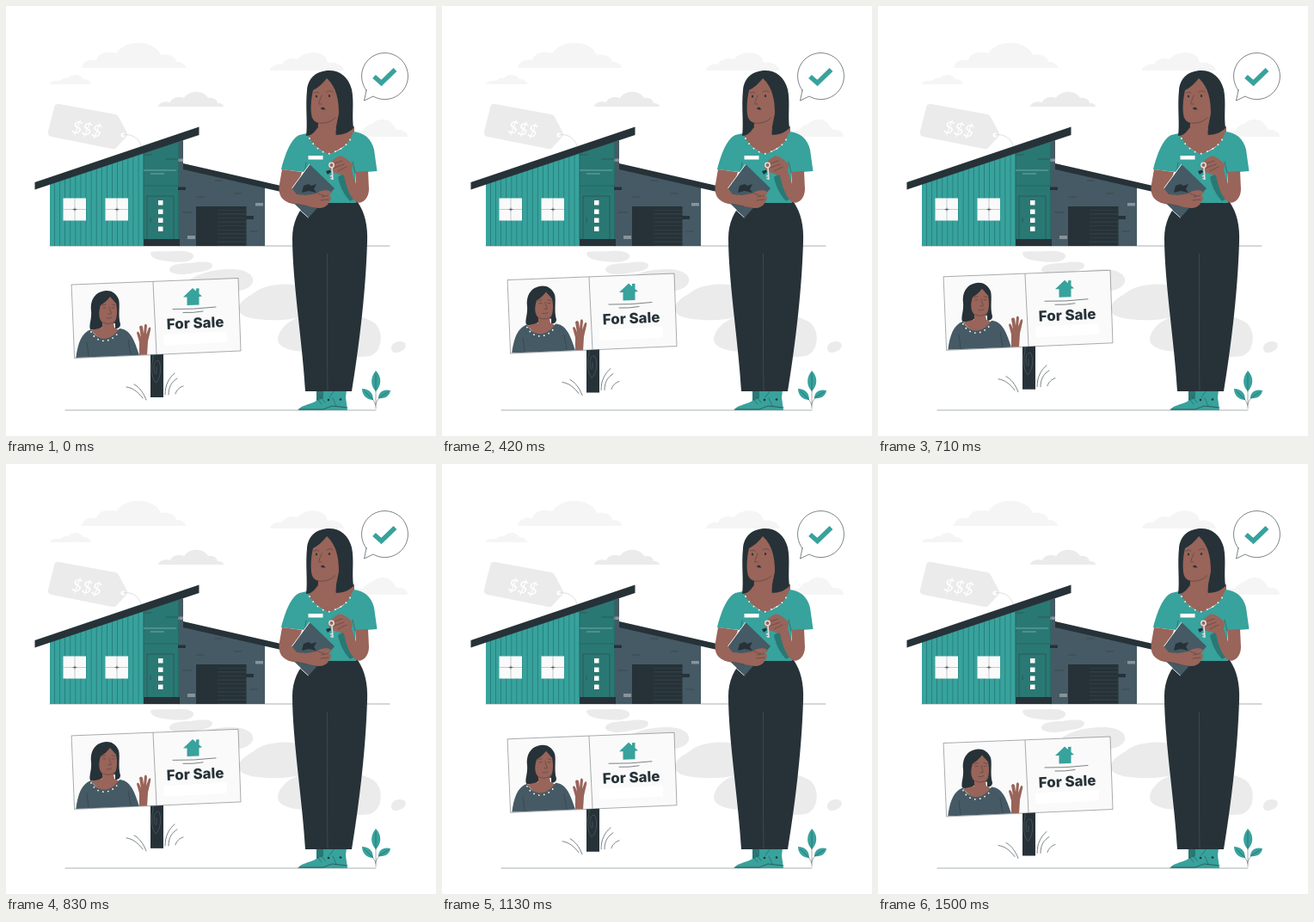
Animation, 500 px wide and 500 px high, one loop 1.54 s. Source, as an HTML page:

```html
<!DOCTYPE html>
<html lang="en">
<head>
<meta charset="utf-8">
<title>For Sale</title>
<style>
  html, body { margin: 0; height: 100%; overflow: hidden; background: #fff; }
  svg { display: block; width: 100%; height: 100%; }
  .dark { fill: #263238; }
  .slate { fill: #455a64; }
  .teal { fill: #38a29c; }
  .deep { fill: #2a7874; }
  .skin { fill: #996459; }
  .grey { fill: #ebebeb; }
  .pale { fill: #f5f5f5; }
  .white { fill: #fff; }
  .line { fill: none; stroke: #263238; stroke-width: .6; stroke-linecap: round; stroke-linejoin: round; }
  .fine { stroke-width: .4; }
  .soft { stroke: #6d7c83; }
  .beads { fill: none; stroke: #fff; stroke-linecap: round; stroke-width: 1.8; }
</style>
</head>
<body>
<svg viewBox="0 0 500 500">
  <defs>
    <clipPath id="wall"><path d="M51 207 160 171V279H51Z"/></clipPath>
    <clipPath id="portrait"><path d="M77 324 171 321 175 405 80 409Z"/></clipPath>
  </defs>

  <!-- sky -->
  <g class="pale">
    <path d="M88 72C89 65 97 61 105 63 107 54 119 52 128 55 136 43 154 40 167 45 174 48 178 52 180 57 190 55 198 60 198 65 205 65 209 68 209 72Z"/>
    <path d="M307 75C308 69 315 67 321 68 324 61 333 60 339 62 346 54 360 52 368 57 373 60 373 63 374 66 384 64 391 69 393 75Z"/>
    <path d="M51 91C52 87 58 86 63 87 66 84 69 83 72 84 77 78 86 79 90 85 95 85 99 88 99 91Z"/>
    <path d="M400 152C402 145 410 145 415 145 419 139 422 138 426 137 432 130 445 131 449 137 452 140 453 142 454 144 462 143 467 147 467 152Z"/>
  </g>
  <path class="grey" d="M177 117C178 112 185 110 191 112 193 106 201 105 207 107 213 98 229 97 235 107 242 106 246 110 246 113 251 113 253 115 253 117Z"/>

  <!-- price tag -->
  <path class="grey" d="M62 114 127 126Q129 126 131 129L140 146Q142 149 140 152L129 164Q127 167 123 166L53 152Q48 151 49 146L56 118Q57 113 62 114Z"/>
  <circle class="white" cx="136" cy="150" r="2.6"/>
  <path d="M136 150C146 148 155 154 157 163" fill="none" stroke="#dedede"/>
  <text class="white" transform="translate(75 147) rotate(10) skewX(-8)" font-family="Lato, sans-serif" font-size="20">$$$</text>

  <!-- stepping stones -->
  <g class="grey">
    <path d="M168 287C170 284 187 286 197 285 211 284 220 288 218 292 216 297 205 299 190 297 177 296 168 293 168 287Z"/>
    <path d="M190 307C190 300 205 299 215 299 223 297 241 296 240 302 239 309 222 309 215 311 204 313 191 312 190 307Z"/>
    <path d="M214 318C225 311 239 306 262 306 278 306 289 312 287 321 284 331 263 335 245 330 230 327 216 326 214 318Z"/>
    <path d="M271 350C273 341 283 338 292 331 306 322 333 322 344 326V361C329 366 309 366 292 364 277 362 270 359 271 350Z"/>
    <path d="M316 388C317 375 330 363 350 360 382 354 413 358 428 368 440 378 438 403 423 407 403 410 386 405 366 401 346 404 317 401 316 388Z"/>
    <path d="M448 397C449 390 460 388 464 392 467 397 461 402 454 403 449 403 448 401 448 397Z"/>
  </g>

  <!-- house -->
  <path class="line soft" d="M51 279H446"/>
  <path class="slate" d="M200 158 206 156V189L301 211V279H200Z"/>
  <path class="dark" d="M206 183 324 210V217L206 190Z"/>
  <path class="teal" d="M51 207 160 171V279H51Z"/>
  <path clip-path="url(#wall)" d="M56 225H160" fill="none" stroke="#237a78" stroke-width="110" stroke-dasharray=".8 5.3"/>
  <path class="deep" d="M160 171 202 157V279H160Z"/>
  <path d="M160 209H201M160 172V271" stroke="#1f5f5e" stroke-width=".7"/>
  <path d="M160 191H198M168 195H184" stroke="#8fc0bd" stroke-width=".7"/>
  <path class="line fine" d="M160 173H169M186 178H200M164 271V221H195V271M168 246V251"/>
  <path class="dark" d="M160 271H202V279H160ZM33.500 205 224.500 140.500V150L33.500 213.500Z"/>
  <path class="white" d="M177 226h5.500v5.500h-5.500zM177 236.500h5.500v5.500h-5.500zM177 246.500h5.500v5.500h-5.500zM177 256.500h5.500v5.500h-5.500z"/>
  <g id="window">
    <path d="M66.500 223.500H93V249.500H66.500Z" fill="#fafafa"/>
    <path class="line fine soft" d="M80 224V249M67 236.500H93"/>
    <path class="line" d="M78 236.500H82M80 235V238"/>
  </g>
  <use href="#window" x="49"/>
  <path class="dark" d="M221 233H279.500V279H221ZM200 210.500H209V214H200ZM279 244H288V248H279Z"/>
  <path d="M262.500 237V279" fill="none" stroke="#3a484f" stroke-width="33" stroke-dasharray=".6 4"/>
  <path d="M200 177.500H206V181H200ZM211 267H220V271H211ZM290 229H299V232.500H290Z" fill="#87949a"/>
  <path class="line fine" d="M205 240H215M243 203H251M284 262H292M222 222H230M266 218H274M201 159V279"/>

  <!-- speech bubble -->
  <path class="line" style="fill:#fff" d="M419 98 416.500 110 427 105A27 27 0 1 0 419 98Z"/>
  <path d="M428 82 436.500 89.500 452.500 74" fill="none" stroke="#38a29c" stroke-width="5.500"/>

  <!-- foreground -->
  <path class="line soft" d="M69 470H430"/>
  <path class="line fine" d="M430 468V436M430 465C429 459 424 455 418 449M430 463C431 457 437 453 444 449"/>
  <g class="teal">
    <path d="M430 448C423 441 424 431 430 424 437 431 437 441 430 448Z"/>
    <path d="M427 458C419 458 414 452 414 445 422 445 427 450 427 458Z"/>
    <path d="M433 456C433 449 439 445 447 447 446 454 440 457 433 456Z"/>
  </g>
  <path class="line fine" d="M430 428V448M417 448 427 458M444 449 433 456"/>

  <!-- agent -->
  <path class="deep" d="M361 445H380V465H361Z"/>
  <path class="teal" d="M369 447H396L395 455 397 470H340C342 464 353 464 361 459L369 456Z"/>
  <path class="line" d="M340 469H369L379 465 397 467"/>
  <path class="line fine" d="M362 457 367 463M366 455 371 461M382 447 376 455M380 456 384 465"/>
  <circle class="dark" cx="375" cy="458" r="1.300"/><circle class="dark" cx="389" cy="457.500" r="1.300"/>
  <path class="dark" d="M350 228H409C417 240 421 255 420 275 418 340 409 405 402 448H348C345 393 333 320 333 270 333 252 340 238 350 228Z"/>
  <path d="M373.500 288C374 340 373 400 374 447" fill="none" stroke="#455a64" stroke-width=".6"/>

  <path class="skin" d="M350 140H405V156L375 174 350 156Z"/>
  <path class="teal" d="M350 148C355 160 364 168 375 172 388 169 399 162 404 146 416 147 425 154 428 167L431.500 192 406 194 407 229H347L346 193 320 190C325 170 332 154 341 150Z"/>
  <path class="deep" d="M386 199 395 193C397 207 401 216 407 223L400 227C392 218 388 209 386 199Z"/>
  <path class="line fine" d="M347 194 349 182M406 194 403 181"/>
  <path class="beads" d="M353 154C358 163 366 170 375 172 387 168 396 164 402 152" stroke-dasharray="0 7.500"/>
  <path class="white" d="M351.500 174H368.500V178.500H351.500Z"/>

  <path class="dark" d="M376 75C361 75 351 84 350 98 348 117 351 137 349 151 354 151 358 148 362 142L384 142 383 150C392 150 399 147 404 142 402 126 405 112 402 97 398 82 388 75 376 75Z"/>
  <path class="skin" d="M373 84C368 91 361 96 357 98 354 111 354 123 356 130 358 134 361 135 363 136L362 154 375 168 384 152 383 145 387 125C387 111 385 95 373 84Z"/>
  <path class="line fine" d="M358 101Q361 99 364 101M373 100Q377 97 380 100M367 104C366 109 363 112 364 114H367M363 136Q374 138 383 130"/>
  <ellipse class="dark" cx="361" cy="105" rx="1.100" ry="1.500"/><ellipse class="dark" cx="376" cy="104.500" rx="1.100" ry="1.500"/>
  <path class="dark" d="M365.500 119 369 117.500 371.500 120.500 368 120.500Z"/>

  <path class="skin" d="M321 190 344 193 340 207 349 215 368 213 378 222 375 229C371 235 364 236 357 234L333 230C320 227 316 219 318 207Z"/>
  <path class="slate" d="M353 184 382 212 352 246 326 221Z"/>
  <path d="M353 184 331 214M335 231 351.500 246" fill="none" stroke="#fff" stroke-width=".9"/>
  <path class="dark" d="M346 209 352 207 355 209 361 207 358 213 361 217 352 215 344 217Z"/>
  <path class="skin" d="M318 207C318 220 326 228 336 230L357 234C366 236 373 234 375 229L378 225 377 222 371 221 379 218C378 213 367 213 361 218L349 220 338 219 330 209Z"/>
  <path class="line fine" d="M363 218 371 221 367 222M366 226 375 225M338 230 351 233"/>

  <path class="skin" d="M406 193 421 192 422 213C422 224 414 231 407 228 399 222 395 207 393 197L382 194 375 188C374 183 380 179 386 175 391 173 398 179 403 184L402 192 407 207Z"/>
  <path class="line fine" d="M382 183 391 180M382 188 393 184M386 192 396 187"/>
  <circle cx="378.500" cy="185" r="2.700" fill="none" stroke="#e0e0e0" stroke-width="1.500"/>
  <path d="M379 188 380 202M380 197 377 198M380 200 377.500 201" fill="none" stroke="#e0e0e0" stroke-width="1.600"/>
  <path class="dark" d="M372 192 377 190.500 378 193 374 196Z"/>

  <!-- sign -->
  <g id="sign">
    <path class="dark" d="M168 403H183V455H168Z"/>
    <path class="line fine soft" d="M171 404V411C168 419 169 432 174 438 180 433 181 420 178 413 175 411 172 414 172 421 172 426 174 430 175 426V420"/>
    <path class="line" d="M163 458C160 450 155 443 149 440M159 456C153 448 147 444 140 443M185 452C185 441 189 433 196 427M189 452C189 442 193 437 199 433M197 451C198 447 202 443 206 442"/>
    <path class="line fine" style="fill:#fafafa" d="M76.500 324 270 316.500 273 401 80 409.500Z"/>
    <path class="line fine" d="M171 321 175 404.500"/>
    <g clip-path="url(#portrait)">
      <path class="dark" d="M117 331C103 332 98 342 99 354 100 364 96 371 98 376 104 378 110 376 114 371L127 369 127 375C131 375 133 373 133 370 130 360 133 348 131 341 128 334 123 331 117 331Z"/>
      <path class="skin" d="M121 338C117 343 113 346 110 348 107 357 108 364 112 368V374L99 377 111 390 123 390 132 377 126 374 125 369C129 366 130 355 128 346Z"/>
      <path class="slate" d="M99 376C106 390 121 391 132 375 143 376 148 384 155 406L81 412C83 394 87 380 99 376Z"/>
      <path class="beads" d="M99 379C106 393 122 393 132 378" stroke-dasharray="0 6"/>
      <path class="line fine" d="M94 391 96 407M142 388 145 405M112 348 116 347M123 347 127 348M113 351H116M123 351H126M120 350C120 354 123 356 122 358H119M117 363Q121 364 123 362M113 368Q121 372 127 366"/>
      <path class="skin" d="M155 407V391L152 380Q153 377 155 380L157 385 155 373Q157 370 159 373L160 381 161 371Q163 368 164 372L163 382 166 374Q169 372 168 377L165 390 164 407Z"/>
    </g>
    <path class="teal" d="M206 338.500 217 328 221 331.500V328.500L224.500 328.300V334.500L228 337.500 224.500 338V347.500L210.500 348V338.500Z"/>
    <path class="line" d="M194 352.500Q218 353 244 350M206 356.500Q218 357 229 355"/>
    <text class="dark" transform="translate(187 376) rotate(-2.500)" font-family="Inter, sans-serif" font-weight="800" font-size="16.900">For Sale</text>
    <path class="white" d="M186 382 254 378.500Q257 378.500 257 381V388Q257 391 254 391L187 394.500Q183 395 183 391V385Q183 382 186 382Z"/>
  </g>
</svg>
<script>
  const LOOP = 1540, PEAK = 728, TRAVEL = 10;
  const sign = document.getElementById("sign");
  const half = LOOP / 2;

  // Constant speed up and down, highest at PEAK.
  function height(time) {
    const phase = (time - PEAK + 2 * LOOP) % LOOP;
    return TRAVEL * Math.abs(phase - half) / half;
  }

  const start = performance.now();
  function draw() {
    const time = (performance.now() - start) % LOOP;
    sign.setAttribute("transform", `translate(0 ${height(0) - height(time)})`);
    requestAnimationFrame(draw);
  }
  draw();
</script>
</body>
</html>
```
